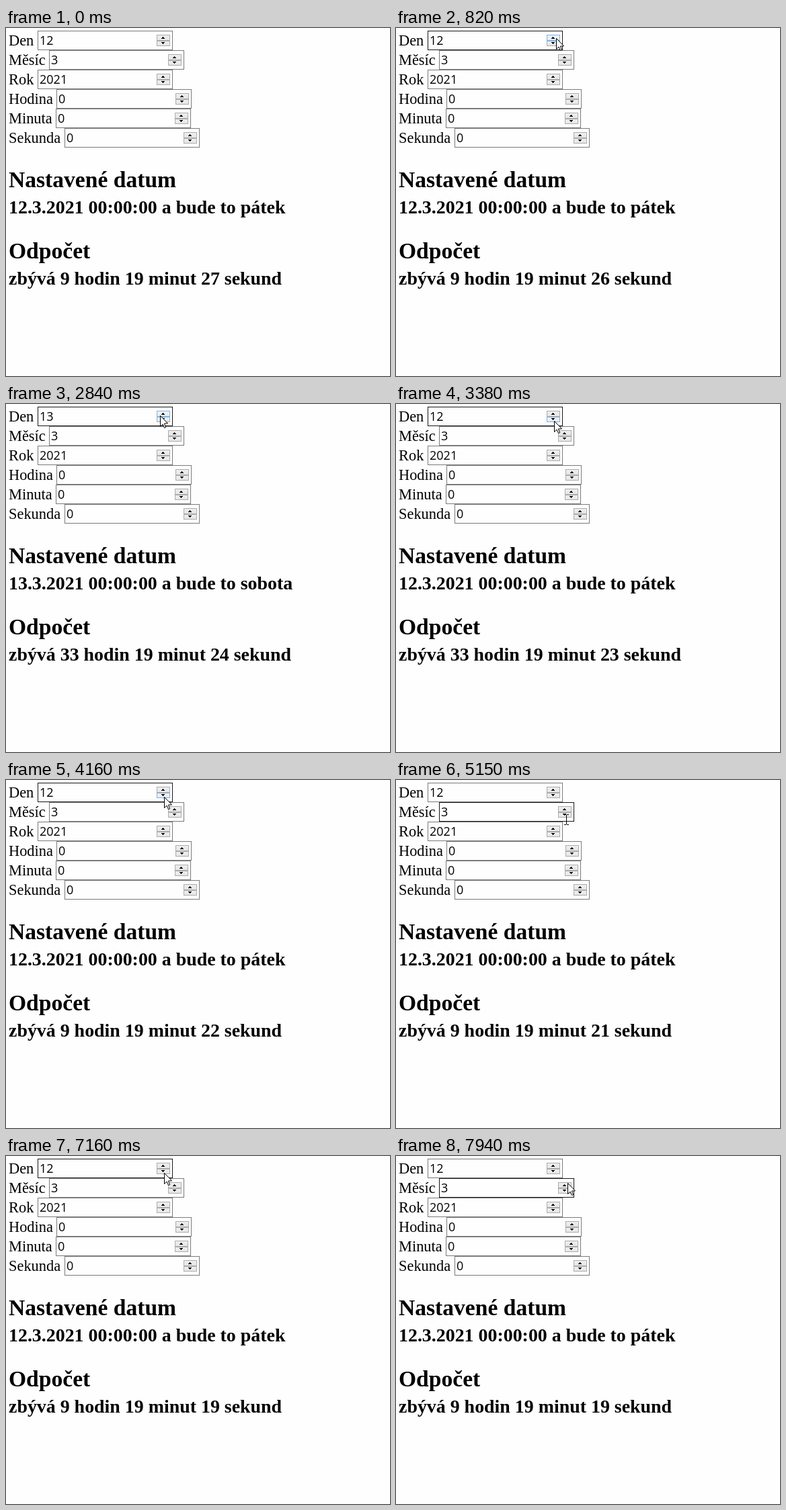
These frames come from a looping animation (571 by 518 pixels, 8000 ms). An HTML page with a canvas:

```html
<!DOCTYPE html>
<html lang="cs">
<head>
<meta charset="utf-8">
<title>Odpočet</title>
<style>
  html, body { margin: 0; width: 100%; height: 100%; overflow: hidden; background: #fefefe; }
  canvas { display: block; }
</style>
</head>
<body>
<canvas id="stage" width="571" height="518"></canvas>
<script>
const ctx = document.getElementById('stage').getContext('2d');
const LOOP = 8000;
const SERIF = '"Liberation Serif", "Times New Roman", serif';
const SANS = '"Open Sans", "Noto Sans", sans-serif';
const FIELD_W = 201, FIELD_H = 29;
const SPIN_W = 20, SPIN_INSET = 177, SPIN_TOP = 6, UP_H = 9, DOWN_H = 8;
const HOVER_DELAY = 77;

const fields = [
  ['Den', 47, '12'],
  ['Měsíc', 64, '3'],
  ['Rok', 47, '2021'],
  ['Hodina', 75, '0'],
  ['Minuta', 74, '0'],
  ['Sekunda', 87, '0'],
].map(([label, x, value], i) => {
  const y = 4 + i * FIELD_H;
  const up = { x: x + SPIN_INSET, y: y + SPIN_TOP, w: SPIN_W, h: UP_H };
  const down = { ...up, y: up.y + UP_H, h: DOWN_H, isDown: true };
  return { label, value, x, y, w: FIELD_W, h: FIELD_H, buttons: [up, down] };
});

// Where the pointer turns or rests: time, x, y
const pointerKeys = [
  [290, 508, 376], [740, 242, 17], [820, 238, 15], [980, 229, 17],
  [2840, 229, 17], [3150, 235, 25], [4540, 235, 25],
  [5150, 253, 59], [5310, 249, 52], [6700, 249, 50],
  [6930, 238, 28], [7240, 235, 25], [7710, 235, 25], [7940, 255, 40],
];

const within = (v, from, to) => v >= from && v < to;
const over = (p, box) => p && within(p.x, box.x, box.x + box.w) && within(p.y, box.y, box.y + box.h);
const smooth = s => s * s * (3 - 2 * s);

function pointerAt(t) {
  const next = pointerKeys.findIndex(key => key[0] > t);
  if (next === 0) return null;
  const to = pointerKeys.at(next);
  const from = next < 0 ? to : pointerKeys[next - 1];
  const s = next < 0 ? 1 : smooth((t - from[0]) / (to[0] - from[0]));
  const mix = i => Math.round(from[i] + (to[i] - from[i]) * s);
  return { x: mix(1), y: mix(2) };
}

function text(str, x, y, font) {
  ctx.font = font;
  ctx.fillStyle = '#000';
  ctx.fillText(str, x, y);
}

function frame({ x, y, w, h }, color) {
  ctx.lineWidth = 1;
  ctx.strokeStyle = color;
  ctx.strokeRect(x + 0.5, y + 0.5, w - 1, h - 1);
}

function drawButton(button, hot) {
  const { x, y, w, h, isDown } = button;
  const fill = ctx.createLinearGradient(0, y, 0, y + h);
  fill.addColorStop(0, hot ? '#ecf4fc' : '#f0f0f0');
  fill.addColorStop(1, hot ? '#dcecfc' : '#e5e5e5');
  ctx.fillStyle = fill;
  ctx.fillRect(x, y, w, h);
  frame(button, hot ? '#7eb4ea' : '#acacac');
  ctx.fillStyle = '#000';
  for (let row = 0; row < 3; row++) {
    const half = isDown ? 2 - row : row;
    ctx.fillRect(x + 9 - half, y + (isDown ? 2 : 3) + row, half * 2 + 1, 1);
  }
}

function drawField(field, value, pointer, hoverPoint) {
  text(field.label, 4, field.y + 22, `22.4px ${SERIF}`);
  frame(field, over(pointer, field) ? '#171717' : '#7a7a7a');
  text(value, field.x + 3, field.y + 21, `500 18px ${SANS}`);
  field.buttons.forEach(button => drawButton(button, over(hoverPoint, button)));
}

function drawArrow(x, y) {
  const outline = [[0, 0], [0, 16], [3.6, 12.6], [6, 18], [8.2, 17.2], [5.9, 11.6], [11, 11.3]];
  ctx.beginPath();
  outline.forEach(([dx, dy]) => ctx.lineTo(x + 0.5 + dx, y + 0.5 + dy));
  ctx.closePath();
  ctx.fillStyle = '#fff';
  ctx.fill();
  ctx.lineWidth = 1;
  ctx.strokeStyle = '#000';
  ctx.stroke();
}

function drawBeam(x, y) {
  ctx.fillStyle = '#000';
  ctx.fillRect(x, y - 7, 1, 14);
  for (const edge of [y - 8, y + 7]) {
    ctx.fillRect(x - 3, edge, 3, 1);
    ctx.fillRect(x + 1, edge, 3, 1);
  }
}

function drawPointer(p) {
  const field = fields.find(f => over(p, f));
  const onText = field && !field.buttons.some(button => over(p, button));
  (onText ? drawBeam : drawArrow)(p.x, p.y);
}

const isNextDay = t => within(t, 1360, 3300);

function draw(t) {
  ctx.fillStyle = '#fefefe';
  ctx.fillRect(0, 0, 571, 518);

  const pointer = pointerAt(t);
  const hoverPoint = pointerAt(t - HOVER_DELAY);
  const nextDay = isNextDay(t);
  const day = nextDay ? '13' : '12';
  fields.forEach((field, i) => drawField(field, i ? field.value : day, pointer, hoverPoint));

  // The countdown only notices a new date on its next tick
  const ticks = Math.floor((t + 880) / 1000);
  const hours = isNextDay(ticks * 1000 - 880) ? 33 : 9;
  const heading = `bold 33.6px ${SERIF}`, line = `bold 27.9px ${SERIF}`;
  text('Nastavené datum', 4, 237, heading);
  text(`${day}.3.2021 00:00:00 a bude to ${nextDay ? 'sobota' : 'pátek'}`, 4, 276, line);
  text('Odpočet', 4, 343, heading);
  text(`zbývá ${hours} hodin 19 minut ${27 - ticks} sekund`, 4, 382, line);

  if (pointer) drawPointer(pointer);
}

const start = performance.now();
function tick() {
  draw((performance.now() - start) % LOOP);
  requestAnimationFrame(tick);
}
tick();
</script>
</body>
</html>
```
